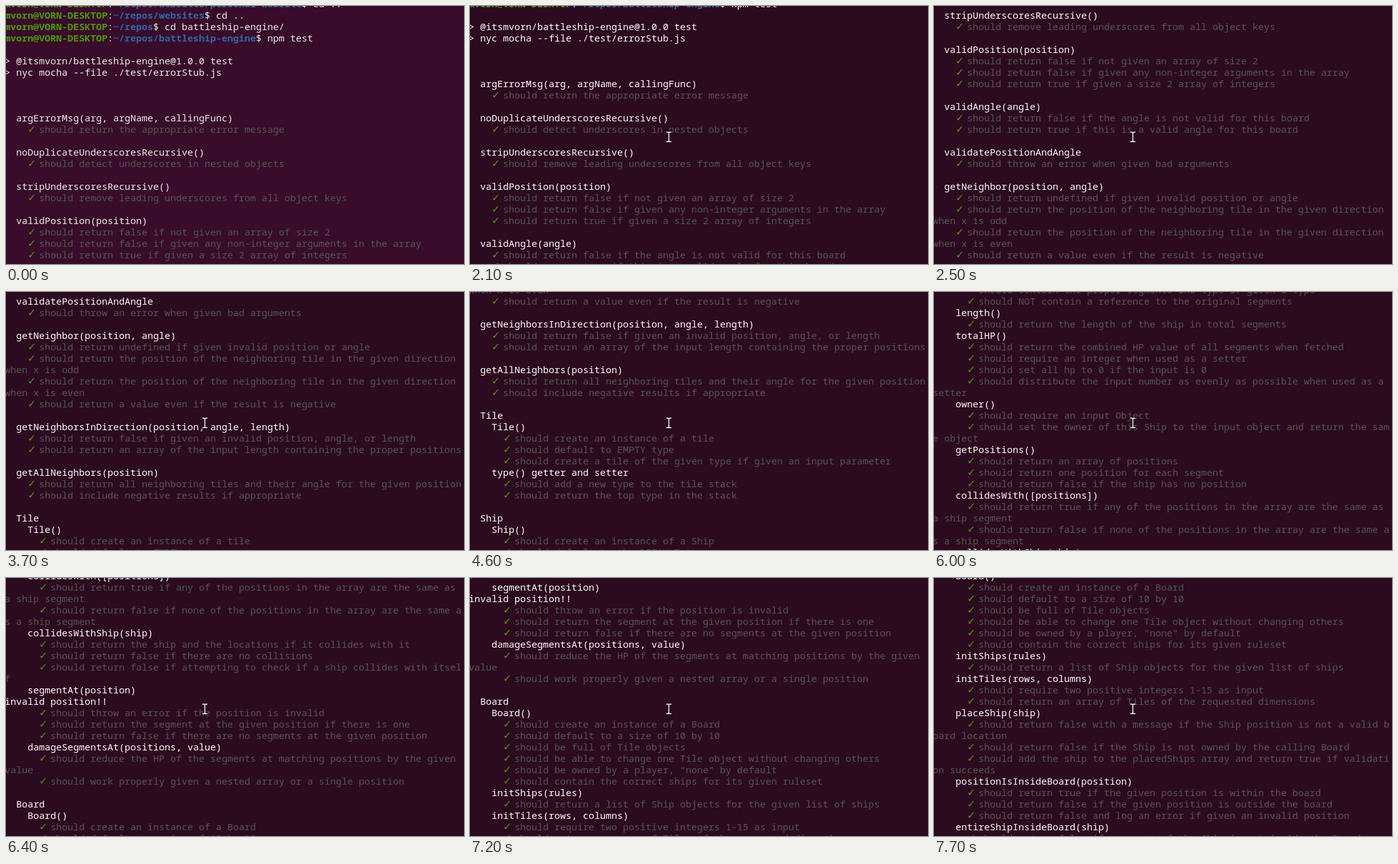
An HTML page for the animation above (8000 ms loop, 722x407 px).

```html
<!DOCTYPE html>
<html lang="en">
<head>
<meta charset="utf-8">
<title>Terminal test run</title>
<style>
  html, body { margin: 0; width: 100%; height: 100%; overflow: hidden; background: #2c0a1f; }
  svg { display: block; width: 100vw; height: 100vh; }
  text { font: 15px "Noto Sans Mono", "DejaVu Sans Mono", monospace; white-space: pre; }
  .user { fill: #4e9a06; font-weight: 700; }
  .path { fill: #3465a4; font-weight: 700; }
  .dim { fill: #555753; }
  .tick { fill: #4e9a06; font: 16px "DejaVu Sans", sans-serif; }
</style>
</head>
<body>
<svg viewBox="0 0 722 407">
  <rect id="bg" width="722" height="407"/>
  <g id="log"></g>
  <g id="cursor" fill="none">
    <path d="M-4-7.5H-1.5Q0-7.5 0-6Q0-7.5 1.5-7.5H4M0-6.500V6.500M-4 7.500H-1.500Q0 7.500 0 6Q0 7.500 1.500 7.500H4" stroke="#16060f" stroke-width="3.400"/>
    <path d="M-4-7.5H-1.5Q0-7.5 0-6Q0-7.5 1.5-7.5H4M0-6.500V6.500M-4 7.500H-1.500Q0 7.500 0 6Q0 7.500 1.500 7.500H4" stroke="#fff" stroke-width="1.500"/>
  </g>
</svg>
<script>
const LOOP = 8000, ROW = 18, CELL = 9, COLS = 80, LEFT = -2;
const PROMPT = 'mvorn@VORN-DESKTOP';

const output = `$~/repos/websites/personal-website$ cd ..
$~/repos/websites$ cd ..
$~/repos$ cd battleship-engine/
$~/repos/battleship-engine$ npm test

> @itsmvorn/battleship-engine@1.0.0 test
> nyc mocha --file ./test/errorStub.js



  argErrorMsg(arg, argName, callingFunc)
    ✓ should return the appropriate error message

  noDuplicateUnderscoresRecursive()
    ✓ should detect underscores in nested objects

  stripUnderscoresRecursive()
    ✓ should remove leading underscores from all object keys

  validPosition(position)
    ✓ should return false if not given an array of size 2
    ✓ should return false if given any non-integer arguments in the array
    ✓ should return true if given a size 2 array of integers

  validAngle(angle)
    ✓ should return false if the angle is not valid for this board
    ✓ should return true if this is a valid angle for this board

  validatePositionAndAngle
    ✓ should throw an error when given bad arguments

  getNeighbor(position, angle)
    ✓ should return undefined if given invalid position or angle
    ✓ should return the position of the neighboring tile in the given direction when x is odd
    ✓ should return the position of the neighboring tile in the given direction when x is even
    ✓ should return a value even if the result is negative

  getNeighborsInDirection(position, angle, length)
    ✓ should return false if given an invalid position, angle, or length
    ✓ should return an array of the input length containing the proper positions

  getAllNeighbors(position)
    ✓ should return all neighboring tiles and their angle for the given position
    ✓ should include negative results if appropriate

  Tile
    Tile()
      ✓ should create an instance of a tile
      ✓ should default to EMPTY type
      ✓ should create a tile of the given type if given an input parameter
    type() getter and setter
      ✓ should add a new type to the tile stack
      ✓ should return the top type in the stack

  Ship
    Ship()
      ✓ should create an instance of a Ship
      ✓ should default to the DEFAULT type
      ✓ should contain the proper segments and type if given a type
      ✓ should NOT contain a reference to the original segments
    length()
      ✓ should return the length of the ship in total segments
    totalHP()
      ✓ should return the combined HP value of all segments when fetched
      ✓ should require an integer when used as a setter
      ✓ should set all hp to 0 if the input is 0
      ✓ should distribute the input number as evenly as possible when used as a setter
    owner()
      ✓ should require an input Object
      ✓ should set the owner of this Ship to the input object and return the same object
    getPositions()
      ✓ should return an array of positions
      ✓ should return one position for each segment
      ✓ should return false if the ship has no position
    collidesWith([positions])
      ✓ should return true if any of the positions in the array are the same as a ship segment
      ✓ should return false if none of the positions in the array are the same as a ship segment
    collidesWithShip(ship)
      ✓ should return the ship and the locations if it collides with it
      ✓ should return false if there are no collisions
      ✓ should return false if attempting to check if a ship collides with itself
    segmentAt(position)
invalid position!!
      ✓ should throw an error if the position is invalid
      ✓ should return the segment at the given position if there is one
      ✓ should return false if there are no segments at the given position
    damageSegmentsAt(positions, value)
      ✓ should reduce the HP of the segments at matching positions by the given value
      ✓ should work properly given a nested array or a single position

  Board
    Board()
      ✓ should create an instance of a Board
      ✓ should default to a size of 10 by 10
      ✓ should be full of Tile objects
      ✓ should be able to change one Tile object without changing others
      ✓ should be owned by a player, "none" by default
      ✓ should contain the correct ships for its given ruleset
    initShips(rules)
      ✓ should return a list of Ship objects for the given list of ships
    initTiles(rows, columns)
      ✓ should require two positive integers 1-15 as input
      ✓ should return an array of Tiles of the requested dimensions
    placeShip(ship)
      ✓ should return false with a message if the Ship position is not a valid board location
      ✓ should return false if the Ship is not owned by the calling Board
      ✓ should add the ship to the placedShips array and return true if validation succeeds
    positionIsInsideBoard(position)
      ✓ should return true if the given position is within the board
      ✓ should return false if the given position is outside the board
      ✓ should return false and log an error if given an invalid position
    entireShipInsideBoard(ship)
      ✓ should return false if any part of the Ship is not inside the Board`;

const $ = id => document.getElementById(id);
const bg = $('bg'), log = $('log'), cursor = $('cursor');
let row = 0;

function put(col, text, cls = '') {
  const el = document.createElementNS('http://www.w3.org/2000/svg', 'text');
  el.setAttribute('x', LEFT + col * CELL);
  el.setAttribute('y', 2 + row * ROW);
  el.setAttribute('class', cls);
  el.textContent = text;
  log.append(el);
}

function putPrompt(line) {
  const [, path, command] = line.match(/^\$([^$]*)(.*)$/);
  const col = PROMPT.length + 1;
  put(0, PROMPT, 'user');
  put(col - 1, ':');
  put(col, path, 'path');
  put(col + path.length, command);
}

// Writes one logical line, wrapped at the terminal width.
function putLine(line) {
  if (line.startsWith('$')) {
    putPrompt(line);
    row++;
    return;
  }
  const tick = line.indexOf('✓');
  const cls = tick < 0 ? '' : 'dim';
  if (tick >= 0) put(tick, '✓', 'tick');
  const plain = line.replace('✓', ' ');
  let start = 0;
  do {
    const part = plain.slice(start, start + COLS);
    const body = part.trimStart();
    if (body) put(part.length - body.length, body, cls);
    row++;
    start += COLS;
  } while (start < plain.length);
}

output.split('\n').forEach(putLine);

// Wheel notches, three rows each; a repeated time is a double notch.
const notches = [
  2100, 2200, 2200, 2400, 2500, 3100, 3300, 3600, 3700, 3900, 4000,
  4600, 4700, 4900, 5000, 5000, 5100, 5200, 5400,
  6000, 6100, 6100, 6200, 6200, 6300, 6400,
  7000, 7100, 7200, 7300, 7500, 7600, 7700
];

// Pointer stops: time, x, y
const stops = [
  [300, 563, 327], [400, 558, 303], [600, 558, 290], [700, 558, 284],
  [1400, 470, 254], [1500, 370, 222], [1600, 313.5, 206.5]
];

const mix = (a, b, k) => `rgb(${a.map((v, i) => Math.round(v + (b[i] - v) * k))})`;

function draw(t) {
  const scroll = 3 * notches.filter(n => n <= t).length;
  log.setAttribute('transform', `translate(0 ${-scroll * ROW})`);

  // The window gains focus in three steps.
  const focus = Math.min(3, Math.max(0, Math.floor((t - 500) / 100))) / 3;
  bg.setAttribute('fill', mix([56, 12, 42], [44, 10, 31], focus));
  log.setAttribute('fill', mix([238, 238, 236], [255, 255, 255], focus));

  const stop = stops.filter(s => s[0] <= t).pop();
  cursor.setAttribute('visibility', stop ? 'visible' : 'hidden');
  if (stop) cursor.setAttribute('transform', `translate(${stop[1]} ${stop[2]})`);
}

const begin = performance.now();
function tick() {
  draw((performance.now() - begin) % LOOP);
  requestAnimationFrame(tick);
}
tick();
</script>
</body>
</html>
```
